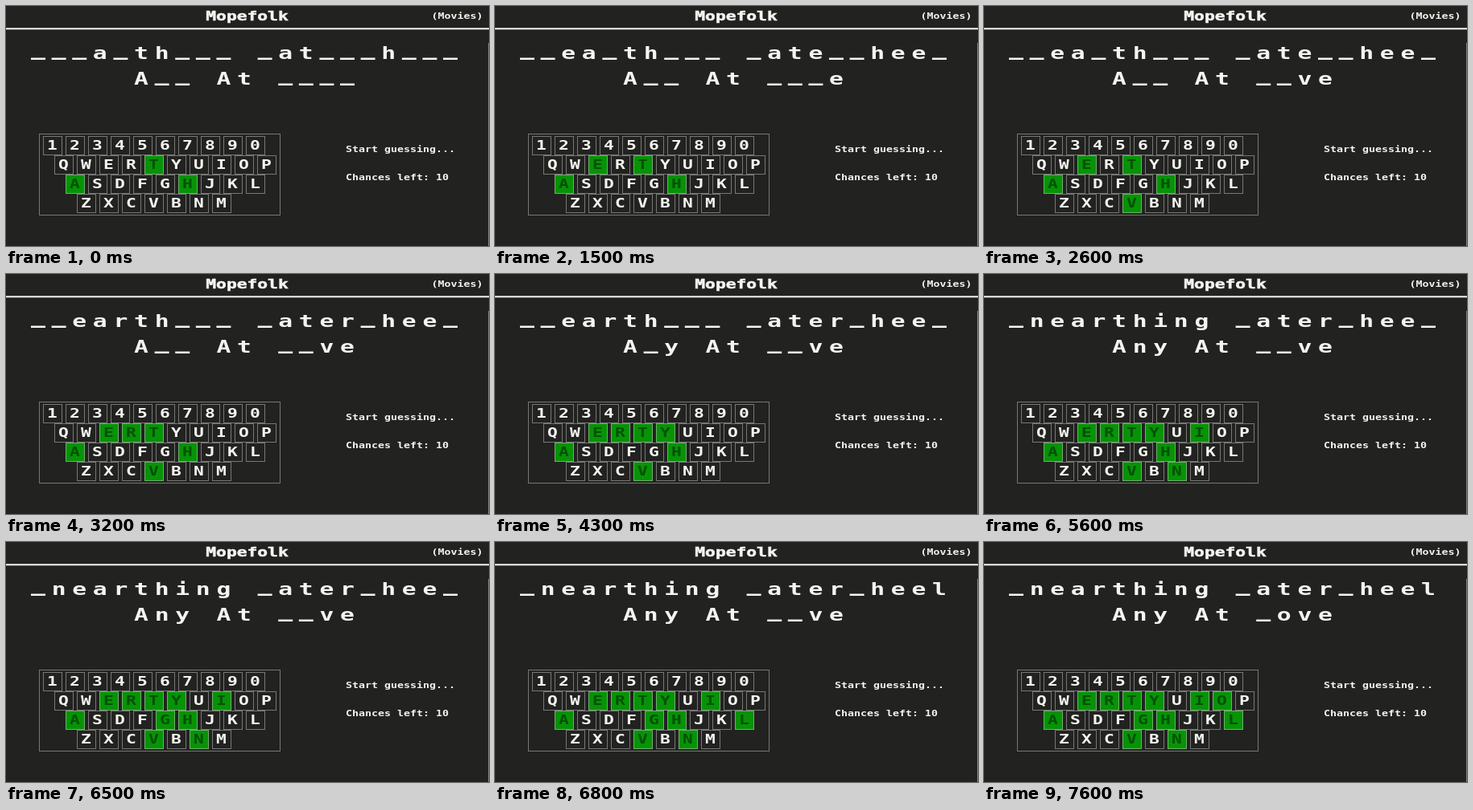
An HTML page for the animation above (8 s loop, 600 by 299 pixels).

```html
<!DOCTYPE html>
<html lang="en">
<head>
<meta charset="utf-8">
<title>Mopefolk</title>
<style>
  html, body { margin: 0; height: 100%; overflow: hidden; background: #222221; }
  svg { display: block; width: 600px; height: 299px; }
  text { font-family: "DejaVu Sans Mono", "Liberation Mono", monospace; font-weight: bold; fill: #f4f4f0; }
  .small { font-size: 9.85px; }
  .medium { font-size: 15.75px; }
  .large { font-size: 22px; }
  .heavy { stroke: #f4f4f0; stroke-width: .5px; }
  .mid { text-anchor: middle; }
  .end { text-anchor: end; }
  .frame { fill: none; stroke: #777775; }
  .blank, .rule { fill: #f4f4f0; }
  .edge { fill: #80807e; }
  .hit rect { fill: #079307; stroke: #6fae6c; }
  .hit text { fill: #045204; }
</style>
</head>
<body>
<svg id="stage" viewBox="0 0 600 299"></svg>
<script>
const LOOP = 8000;
const STEP = 100; // the picture advances ten times a second
const FADE = 250;
const WIDE = 1.35; // proportion of the broad arcade face
const KEY = 23;
const LINES = ["Unearthing Waterwheel", "Any At Cove"];
const ROWS = ["1234567890", "QWERTYUIOP", "ASDFGHJKL", "ZXCVBNM"];

// Time at which each letter is guessed; negative ones are open from the start.
const guessed = {
  A: -LOOP, T: -LOOP, H: -LOOP,
  E: 550, V: 1800, R: 2950, Y: 3750, I: 4550,
  N: 5200, G: 5600, L: 6550, O: 7300
};

const stage = document.getElementById("stage");

function add(parent, tag, attrs = {}) {
  const el = document.createElementNS("http://www.w3.org/2000/svg", tag);
  for (const name in attrs) el.setAttribute(name, attrs[name]);
  return parent.appendChild(el);
}

function box(parent, x, y, width, height, cls) {
  return add(parent, "rect", { x, y, width, height, class: cls });
}

function write(parent, str, x, y, cls) {
  const el = add(parent, "text", {
    class: cls,
    transform: `translate(${x} ${y}) scale(${WIDE} 1)`
  });
  el.textContent = str;
  return el;
}

write(stage, "Mopefolk", 299.5, 18, "medium heavy mid");
write(stage, "(Movies)", 592.5, 16, "small end");
box(stage, 0, 27.3, 600, 2, "rule");
box(stage, 599, 46, 1, 253, "edge");
write(stage, "Start guessing...", 422, 181.5, "small");
write(stage, "Chances left: 10", 422, 216.5, "small");

const cells = [];
LINES.forEach((line, row) => {
  const pitch = 25.6;
  const first = 296 - pitch * (line.length - 1) / 2;
  const base = 66 + row * 32;
  [...line].forEach((ch, i) => {
    if (ch === " ") return;
    const x = first + i * pitch;
    cells.push({
      at: guessed[ch.toUpperCase()] ?? Infinity,
      letter: write(stage, ch, x, base, "large mid"),
      blank: box(stage, x - 9, base - 1.5, 18, 2.5, "blank")
    });
  });
});

const keys = [];
box(stage, 41.5, 159.5, 299, 101, "frame");
ROWS.forEach((chars, row) => {
  const top = 162.5 + row * 24;
  [...chars].forEach((ch, i) => {
    const left = 46.5 + row * 14 + i * 28;
    const mid = left + KEY / 2 - .5;
    const base = top + 16.5;
    box(stage, left, top, KEY, KEY, "frame");
    write(stage, ch, mid, base, "medium mid");
    if (!(ch in guessed)) return;
    const hit = add(stage, "g", { class: "hit" });
    box(hit, left, top, KEY, KEY);
    write(hit, ch, mid, base, "medium mid");
    keys.push({ at: guessed[ch], hit });
  });
});

function draw(t) {
  for (const { at, letter, blank } of cells) {
    const open = t >= at;
    letter.style.visibility = open ? "visible" : "hidden";
    blank.style.visibility = open ? "hidden" : "visible";
  }
  for (const { at, hit } of keys) {
    const p = Math.min(1, Math.max(0, (t - at) / FADE));
    hit.style.opacity = p * p * (3 - 2 * p);
  }
}

let start;
function tick(now) {
  start ??= now;
  const t = (now - start) % LOOP;
  draw(Math.floor(t / STEP) * STEP);
  requestAnimationFrame(tick);
}
draw(0);
requestAnimationFrame(tick);
</script>
</body>
</html>
```
